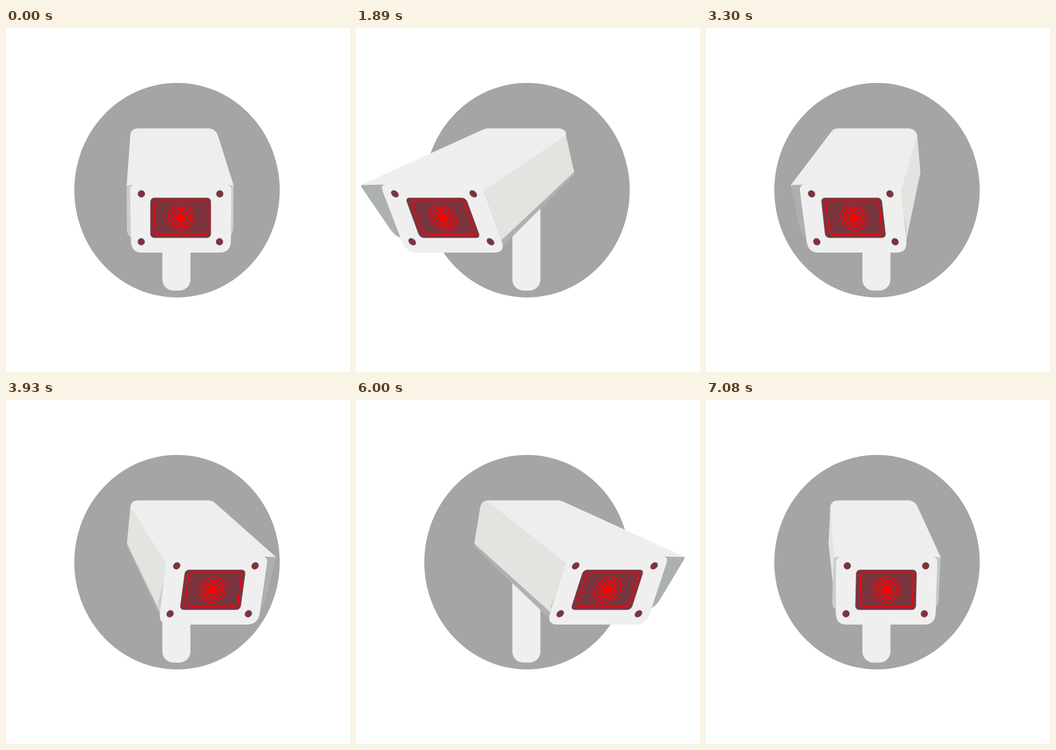
These frames come from a looping animation (700 by 700 pixels, 7.11 s). An HTML page:

```html
<!DOCTYPE html>
<html lang="en">
<head>
<meta charset="utf-8">
<title>Security camera</title>
<style>
html, body { margin: 0; width: 100%; height: 100%; overflow: hidden; background: #fff; }
svg { display: block; width: 100vw; height: 100vh; }
</style>
</head>
<body>
<svg viewBox="0 0 700 700">
  <ellipse cx="348" cy="330" rx="209" ry="218.3" fill="#a5a5a5"/>
  <rect x="318.5" y="340" width="56.5" height="194" rx="22" fill="#efefef" stroke="#f3e6d0" stroke-width=".8"/>
  <g id="strips" fill="#afb2b4"><path/><path/></g>
  <g id="panels" fill="#e2e4df"><path/><path/></g>
  <path id="roof" fill="#eee"/>
  <g id="hoods"><path/><path/></g>
  <g id="front">
    <path fill="#efefef" d="M252 332Q252 318 266 318H444Q458 318 458 332L457 435Q456 457 434 457H276Q255 457 254 435Z"/>
    <g fill="#7a343e" stroke="#a87a80" stroke-width=".8">
      <circle cx="275" cy="337.5" r="7.2"/><circle cx="434.5" cy="337.5" r="7.2"/>
      <circle cx="274.7" cy="435" r="7.2"/><circle cx="434" cy="435" r="7.2"/>
      <rect x="293.3" y="345.5" width="123.2" height="81.5" rx="8"/>
    </g>
    <g fill="none" stroke="#f5050a" stroke-width="2.5">
      <rect x="302.3" y="352.5" width="107.5" height="67" rx="6"/>
      <circle cx="355.5" cy="386" r="25.8"/>
      <circle cx="355.5" cy="386" r="19.8"/>
      <circle cx="355.5" cy="386" r="14.4"/>
    </g>
    <circle cx="355.5" cy="386" r="10.3" fill="#f00"/>
  </g>
</svg>
<script>
const LOOP = 7110, STEP = 30, SWEEP = 3540;
const CENTER = -2.5, REACH = 176, SKEW = 0.00205;
const $ = id => document.getElementById(id);
const clamp = v => Math.min(1, Math.max(0, v));
const mix = (a, b, p) => a + (b - a) * p;
const poly = points => 'M' + points.map(p => p.map(v => v.toFixed(2)).join(' ')).join('L') + 'Z';

// cubic-bezier(.5, 0, .5, 1)
function ease(x) {
  let lo = 0, hi = 1;
  for (let i = 0; i < 24; i++) {
    const m = (lo + hi) / 2;
    if (1.5 * m - 1.5 * m * m + m * m * m < x) lo = m; else hi = m;
  }
  return lo * lo * (3 - 2 * lo);
}

function swing(t) {
  const sweep = start => 1 - 2 * ease(clamp((t - start) / SWEEP));
  const side = t < 1792 ? sweep(-1755) : t < 5360 ? -sweep(1800) : sweep(5380);
  return CENTER + REACH * side;
}

function hull(points) {
  const sorted = points.slice().sort((a, b) => a[0] - b[0] || a[1] - b[1]);
  const half = list => {
    const out = [];
    for (const p of list) {
      while (out.length > 1) {
        const [a, b] = out.slice(-2);
        if ((b[0] - a[0]) * (p[1] - a[1]) - (b[1] - a[1]) * (p[0] - a[0]) > 0) break;
        out.pop();
      }
      out.push(p);
    }
    return out.slice(0, -1);
  };
  return half(sorted).concat(half(sorted.reverse()));
}

function draw(t) {
  const d = swing(t);
  const face = (x, y) => [x + d * (1 + SKEW * (386 - y)), y];
  const hood = (x, y) => [x + d * (1.327 - 0.0038 * (y - 320)), y];
  const back = (x, y) => [x - 0.06 * d * (y - 215) / 77, y];
  const cornerR = 431 + 0.02 * Math.min(d, 0);
  const turn = clamp((d - 66) / 80);

  const strips = $('strips').children, panels = $('panels').children, hoods = $('hoods').children;
  strips[0].setAttribute('d', poly([back(250, 290), back(250, 298), face(259, 447), face(254, 430)]));
  strips[1].setAttribute('d', poly([back(433, 290), back(433, 298), face(452, 447), face(457, 430)]));
  panels[0].setAttribute('d', poly([[268, 204.5], [260, 206], [255, 211], [253, 217],
    back(250, 292), face(254, 432), face(252, 330), [300, 215]]));
  panels[1].setAttribute('d', poly([[cornerR - 6, 210], [cornerR, 219],
    back(433, 293), face(457, 432), face(458, 330)]));

  const topLeft = turn > 0
    ? [[mix(253, 266, turn), mix(217, 205, turn)], [268, 204.3]]
    : [[253, 217], [255, 211], [260, 206], [268, 204.3]];
  $('roof').setAttribute('d', poly(hull([
    ...topLeft, [414, 204.3], [421, 206.5], [427, 211], [cornerR, 218],
    face(252, 331), face(458, 331), hood(245, 320), hood(462.5, 320)
  ])));

  const shade = side => {
    const p = clamp(side * d / 50);
    return `rgb(${[172, 176, 177].map(c => Math.round(mix(205, c, p))).join()})`;
  };
  hoods[0].setAttribute('d', poly([face(268, 318.5), hood(248, 319.5), hood(245, 323), hood(245, 327),
    hood(245.5, 412), hood(248, 421), hood(254, 427), face(280, 427)]));
  hoods[1].setAttribute('d', poly([face(442, 318.5), hood(460, 319.5), hood(462.5, 322), hood(462.5, 327),
    hood(462, 410), hood(460, 418), hood(453, 426), face(430, 426)]));
  hoods[0].setAttribute('fill', shade(-1));
  hoods[1].setAttribute('fill', shade(1));

  $('front').setAttribute('transform', `matrix(1 0 ${-SKEW * d} 1 ${d * (1 + 386 * SKEW)} 0)`);
}

const origin = performance.now();
function tick() {
  const t = (performance.now() - origin) % LOOP;
  draw(Math.floor(t / STEP) * STEP);
  requestAnimationFrame(tick);
}
tick();
</script>
</body>
</html>
```
